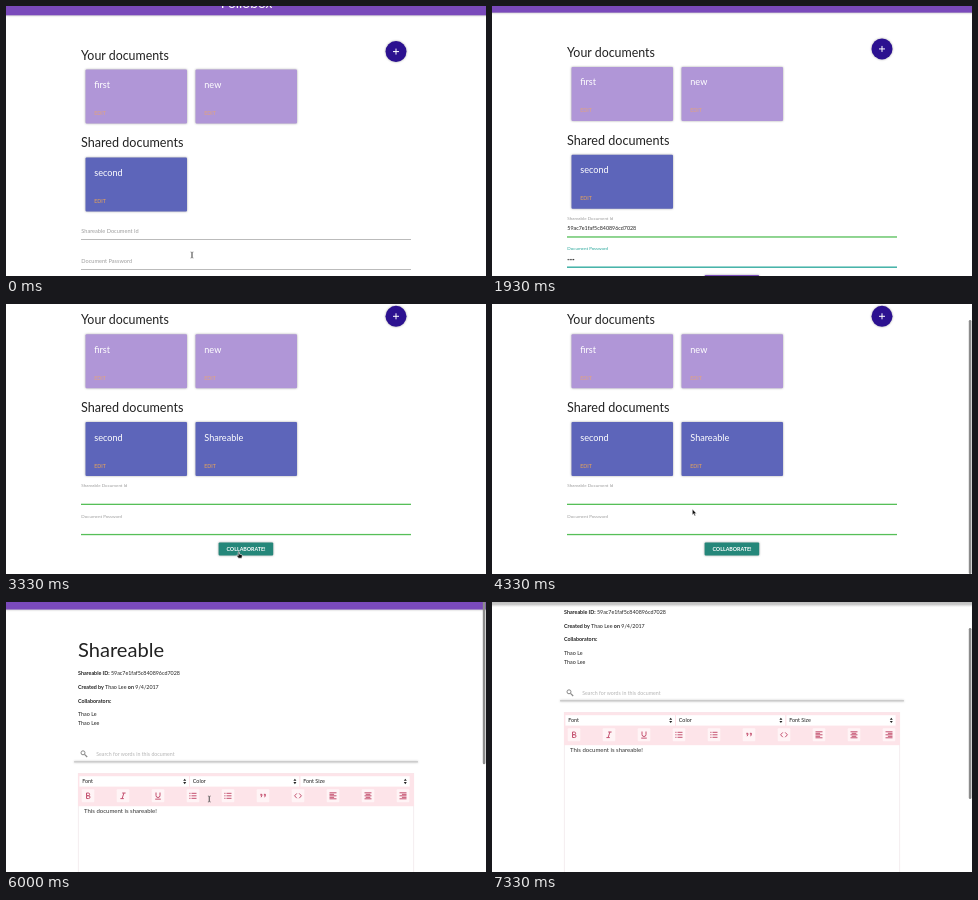
Recreate the animation shown at these times as an HTML page. Size 480 by 270 pixels, loop 7590 ms.

```html
<!DOCTYPE html>
<html lang="en">
<head>
<meta charset="utf-8">
<title>Shared documents</title>
<style>
html, body { margin: 0; width: 100%; height: 100%; overflow: hidden; background: #fff; }
svg { display: block; width: 480px; height: 270px; font-family: Lato, "Open Sans", sans-serif; fill: #222; }
.raised { filter: drop-shadow(0 .7px .8px rgba(0, 0, 0, .35)); }
.icons path { fill: none; stroke: #c4506f; stroke-width: 1; }
</style>
</head>
<body>
<svg id="stage" viewBox="0 0 480 270"></svg>
<script>
const LOOP = 7590;
const PURPLE = '#7a4abb', TEAL = '#26a69a', GREEN = '#56bf58', GREY = '#9e9e9e';
const DOC_ID = '59ac7e1faf5c840896cd7028';
const $ = id => document.getElementById(id);

const text = (x, y, size, str, attrs = '') =>
  `<text x="${x}" y="${y}" font-size="${size}" ${attrs}>${str}</text>`;
const rect = (x, y, w, h, fill, attrs = '') =>
  `<rect x="${x}" y="${y}" width="${w}" height="${h}" fill="${fill}" ${attrs}/>`;
const bold = str => `<tspan font-weight="bold">${str}</tspan>`;

const header = rect(-5, -20, 490, 29.3, PURPLE, 'class="raised"') +
  text(240.5, 2, 13.8, 'Foliobox', 'fill="#fff" text-anchor="middle"');

const card = (x, y, name, fill, edit, id = '') => `<g id="${id}">` +
  rect(x, y, 101.5, 54, fill, 'rx="1" class="raised"') +
  text(x + 8.8, y + 18.5, 9.1, name, 'fill="#fff"') +
  text(x + 8.8, y + 45.5, 5.2, 'EDIT', `fill="${edit}"`) + '</g>';
const ownCard = (x, name) => card(x, 63.6, name, '#b096d7', '#e3a37c');
const sharedCard = (x, name, id) => card(x, 151.4, name, '#5d65ba', '#eda555', id);

const field = (id, y, label) =>
  text(75.3, y, 5.6, label, `id="${id}Label"`) + rect(75, y + 6, 330, 1, GREY, `id="${id}Line"`);

const listPage = `<g id="listPage">${header}` +
  text(75, 53.6, 12.4, 'Your documents') + text(75, 141.3, 12.6, 'Shared documents') +
  '<circle cx="390" cy="45.6" r="10.5" fill="#2c1190" class="raised"/>' +
  '<path d="M387 45.6h6M390 42.6v6" stroke="#fff" stroke-width="1"/>' +
  ownCard(79.5, 'first') + ownCard(189.5, 'new') +
  sharedCard(79.5, 'second') + sharedCard(189.5, 'Shareable', 'newCard') +
  field('doc', 227, 'Shareable Document Id') + text(75.3, 226.8, 5.35, DOC_ID, 'id="docValue"') +
  field('pass', 257.2, 'Document Password') + text(75.3, 257.2, 3.2, '', 'id="passValue"') +
  rect(212.6, 271.7, 54.6, 13, PURPLE, 'id="button" rx="1" class="raised"') +
  text(240, 280.3, 5.3, 'COLLABORATE!', 'fill="#fff" text-anchor="middle" font-weight="bold"') + '</g>';

const rows = [-2.5, 0, 2.5].map(y => `M-1.5 ${y}h5M-3.7 ${y}h1.2`).join('');
const align = side => [-3, -1.5, 0, 1.5, 3].map((y, i) => {
  const w = i % 2 ? 4.6 : 7;
  return `M${-3.5 + (7 - w) * side} ${y}h${w}`;
}).join('');
const icons = [
  'M-1.5-2.8H.3a1.3 1.3 0 0 1 0 2.7h-1.8zM-1.5-.1H.6a1.4 1.4 0 0 1 0 2.8h-2.1z',
  'M-.8-2.8h3.4M.9-2.8L-.9 2.8M-2.6 2.8H.8',
  'M-2-3.3v3a2 2 0 0 0 4 0v-3M-2.8 3.3h5.6',
  rows,
  rows,
  'M-2.6-1.5h1.5v1.2l-.8 1.7M.9-1.5h1.5v1.2l-.8 1.7M-2.6-.7h1.5M.9-.7h1.5',
  'M-1.2-2.4L-3.4 0l2.2 2.4M1.2-2.4L3.4 0 1.2 2.4',
  align(0), align(.5), align(1)
].map((d, i) => `<g transform="translate(${82 + 35 * i} 107.6)">` +
  rect(-6.3, -6.5, 12.6, 13, '#fff4f6', 'rx="1"') + `<path d="${d}"/></g>`).join('');

const select = (x, w, name) => rect(x, 88, w, 10.4, '#fff') + text(x + 2.8, 95.1, 5.4, name) +
  `<path d="M${x + w - 5.8} 92.6l1.5-2.1 1.5 2.1zM${x + w - 5.8} 93.8l1.5 2.1 1.5-2.1z"/>`;

const editor = '<g id="editor">' +
  '<circle cx="77" cy="64.6" r="2" fill="none" stroke="#888"/>' +
  '<path d="M78.5 66.1l2.7 2.7" stroke="#888" stroke-width="1.2"/>' +
  text(90.2, 67.5, 5.25, 'Search for words in this document', 'fill="#b5b5b5"') +
  rect(68, 73.2, 344, .9, '#b8b8b8', 'class="raised"') +
  rect(72.3, 85.3, 335.4, 400, '#fff', 'stroke="#f1e9eb" stroke-width=".8"') +
  rect(72, 85, 336, 33, '#fde4e9') +
  select(73.4, 109.6, 'Font') + select(184, 109.2, 'Color') + select(294.4, 109.2, 'Font Size') +
  `<g class="icons">${icons}</g>` +
  text(78, 124.6, 6, 'This document is shareable!', 'id="body" fill="#333"') + '</g>';

const docPage = `<g id="docPage">${header}` +
  text(72, 42, 5.4, 'Loading...', 'id="loading"') + '<g id="info">' +
  text(72, 56.9, 20.1, 'Shareable') +
  text(72, 74.4, 5.35, bold('Shareable ID: ') + DOC_ID) +
  text(72, 88.4, 5.35, `${bold('Created by')} Thao Lee ${bold('on')} 9/4/2017`) +
  text(72, 102.3, 5.35, bold('Collaborators:')) +
  text(72, 116, 5.35, 'Thao Le') + text(72, 124.4, 5.35, 'Thao Lee') +
  `</g>${editor}</g>`;

const cursors = '<g id="cursor">' +
  '<path id="beam" d="M-1.4-3q1.4 0 1.4 1v4q0 1-1.4 1M1.4-3Q0-3 0-2v4q0 1 1.4 1" fill="none" stroke="#555" stroke-width=".7"/>' +
  '<path id="arrow" d="M0-1v6l1.4-1.2.9 2.1 1-.5-.9-2h1.8z" fill="#111" stroke="#fff" stroke-width=".5"/>' +
  '<path id="hand" d="M-.8-2.6q.6-.6 1.1 0v2.2l2.6.7q.6.3.4 1.2l-.5 2.2h-3.3L-2.6 1.1q.3-.9 1.1-.3l.7.5z" fill="#111" stroke="#fff" stroke-width=".6"/></g>';

$('stage').innerHTML =
  '<linearGradient id="shade" x2="0" y2="1"><stop stop-color="#bdbdbd"/><stop offset=".45" stop-color="#cdcdcd"/><stop offset="1" stop-color="#fff" stop-opacity="0"/></linearGradient>' +
  listPage + docPage + rect(476.8, 0, 2.6, 10, '#8c8c8c', 'id="thumb" rx="1.3"') +
  rect(0, 0, 480, 6, 'url(#shade)', 'id="topShade"') + cursors;

// Linear interpolation through [time, value] pairs
function track(t, keys) {
  const i = keys.findIndex(k => k[0] > t);
  if (i < 0) return keys[keys.length - 1][1];
  if (i === 0) return keys[0][1];
  const [t0, a] = keys[i - 1], [t1, b] = keys[i];
  return a + (b - a) * (t - t0) / (t1 - t0);
}

const LIST_SCROLL = [[1670, 0], [1930, 2.6], [2100, 14], [2250, 27], [2400, 33.3]];
const DOC_SCROLL = [[5930, 0], [6130, 5], [6530, 29.5], [6730, 54], [6870, 62.8]];
const CURSOR = [
  [70, 186, 249], [400, 184, 226], [2200, 240, 222], [2400, 233, 250.5], [3870, 233, 250.5],
  [4330, 200.3, 206], [4470, 200.3, 206], [4670, 204, 163], [4900, 204, 163],
  [5130, 203.3, 197], [7069, 203.3, 197], [7070, 239, 25]
];
const cursorX = CURSOR.map(k => [k[0], k[1]]), cursorY = CURSOR.map(k => [k[0], k[2]]);

const show = (id, on) => $(id).style.display = on ? '' : 'none';
const set = (id, attrs) => { for (const k in attrs) $(id).setAttribute(k, attrs[k]); };
const move = (id, x, y) => set(id, { transform: `translate(${x} ${y})` });

function drawField(id, y, float, focused, valid) {
  set(id + 'Label', { y: y - 10.2 * float, 'font-size': 5.6 - 1.1 * float, fill: focused ? TEAL : GREY });
  set(id + 'Line', { fill: focused ? TEAL : valid ? GREEN : GREY, height: focused || valid ? 1.3 : .7 });
}

function drawList(t) {
  move('listPage', 0, -track(t, LIST_SCROLL));
  const joined = t >= 3000;
  show('newCard', joined);
  drawField('doc', 227, track(t, [[330, 0], [530, 1]]), t >= 330 && t < 1130, t >= 1130);
  drawField('pass', 257.2, track(t, [[1130, 0], [1270, 1]]), t >= 1130 && t < 2700, t >= 2700);
  show('docValue', t >= 860 && !joined);
  const typed = joined ? 0 : Math.floor(track(t, [[1260, 0], [1500, 4]]));
  $('passValue').textContent = '•'.repeat(typed);
  set('button', { fill: t >= 2700 ? '#25877a' : PURPLE });
}

function drawDoc(t) {
  const loaded = t >= 5470;
  move('docPage', 0, -track(t, DOC_SCROLL));
  show('loading', !loaded);
  show('info', loaded);
  move('editor', 0, loaded ? 88 : 0);
  show('body', t >= 5730);
}

function drawThumb(t, onDoc) {
  const y = onDoc ? .57 * track(t, DOC_SCROLL) - 9.8 : .75 * track(t, LIST_SCROLL) - 9;
  const opacity = onDoc ? track(t, [[5930, 0], [6000, 1]])
    : track(t, [[1990, 0], [2060, 1], [2950, 1], [3250, 0], [3870, 0], [3950, 1]]);
  set('thumb', { y, height: onDoc ? 171 : 254, opacity });
}

function drawCursor(t) {
  show('cursor', t < 860 || t >= 2270 && t < 7130);
  move('cursor', track(t, cursorX), track(t, cursorY));
  const hand = t >= 2370 && t < 3950 || t >= 4640 && t < 4900;
  const arrow = !hand && t >= 2270 && t < 5000;
  show('hand', hand);
  show('arrow', arrow);
  show('beam', !hand && !arrow);
}

function frame() {
  const t = performance.now() % LOOP, onDoc = t >= 4900;
  show('listPage', !onDoc);
  show('docPage', onDoc);
  onDoc ? drawDoc(t) : drawList(t);
  drawThumb(t, onDoc);
  drawCursor(t);
  show('topShade', t >= 7330);
  requestAnimationFrame(frame);
}
frame();
</script>
</body>
</html>
```
